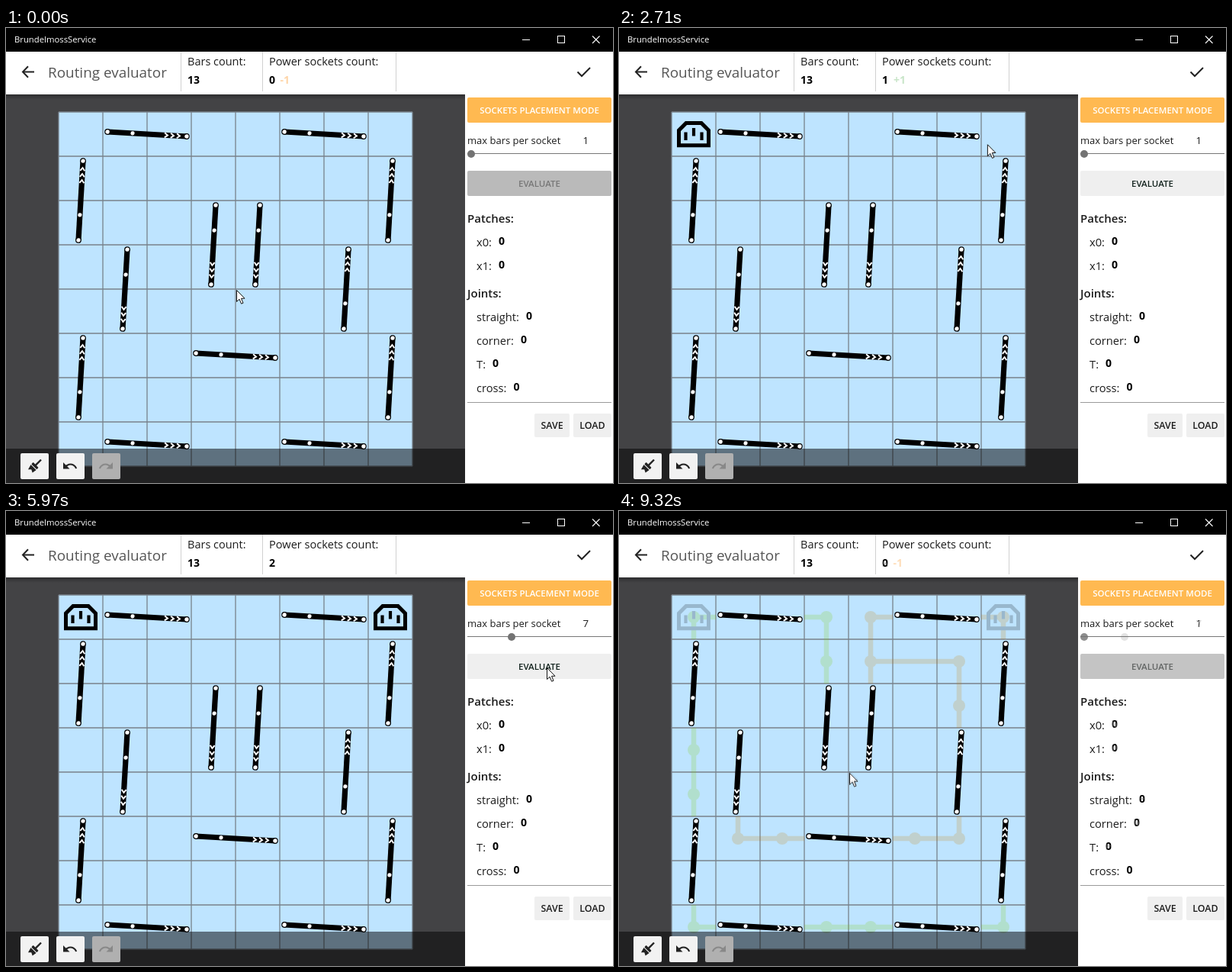
Write an HTML page with a canvas that moves like this. It is 796 px wide and 596 px high and loops after 9.39 s.

```html
<!DOCTYPE html>
<html lang="en">
<head>
<meta charset="utf-8">
<title>Routing evaluator</title>
<style>
html, body { margin: 0; width: 100%; height: 100%; overflow: hidden; background: #fff; }
canvas { display: block; }
</style>
</head>
<body>
<canvas id="stage" width="796" height="596"></canvas>
<script>
const W = 796, H = 596, LOOP = 9390;
const CELL = 58, GX = 69, GY = 110, PANEL = 602;
const SOCKET_1 = 1660, SOCKET_2 = 2930, DRAG = 3820, DRAG_END = 4880, DROP = 5085;
const SOLVED = 6050, FADE = 8630, DELTA_LIFE = 1250;
const INK = '#1c1c1c';

const stage = document.getElementById('stage').getContext('2d');
const layer = document.createElement('canvas');
layer.width = W;
layer.height = H;
const layerCtx = layer.getContext('2d');
let c = stage;

// > ^ v: two-cell bars by heading; g o: joints of the two circuits; -: plain wire
const board = `
g>>go>>o
^..go-o^
^..vv.o^
gv.vv.^.
gv....^.
^oo>>oo^
^......^
g>>gg>>g`.trim().split('\n');
const wireColors = { g: '#80cc00', o: '#cc7f00', '-': '#cc7f00' };
const quarterTurns = { '>': 0, 'v': 1, '^': -1 };

// eased pointer moves
const home = { x: 302, y: 343 };
const moves = [
  { from: 550, to: 1320, x: 119, y: 169 },
  { from: 1520, to: 1640, x: 120, y: 156 },
  { from: 1900, to: 2860, x: 508, y: 152 },
  { from: 3200, to: 3690, x: 608, y: 168 },
  { from: 3900, to: DRAG_END, x: 663, y: 168 },
  { from: DROP, to: 5570, x: 709, y: 205 },
  { from: 6390, to: 6880, x: 609, y: 231 },
  { from: 6880, to: 8070, x: 302, y: 341 }
];
const presses = [SOCKET_1, SOCKET_2, SOLVED].map(t => [t - 70, t + 190]).concat([[DRAG, DROP]]);

const clamp = (v, a = 0, b = 1) => Math.min(b, Math.max(a, v));
const smooth = u => u * u * (3 - 2 * u);
const cellAt = (col, row) => (board[row] || '')[col] || '.';

function rect(x, y, w, h, fill, radius = 0) {
  c.fillStyle = fill;
  c.beginPath();
  c.roundRect(x, y, w, h, radius);
  c.fill();
}

function disc(x, y, r, fill) {
  c.fillStyle = fill;
  c.beginPath();
  c.arc(x, y, r, 0, Math.PI * 2);
  c.fill();
}

function trace(points) {
  c.beginPath();
  points.forEach(p => c.lineTo(p[0], p[1]));
}

function line(points, color, width = 1, close = false) {
  trace(points);
  if (close) c.closePath();
  c.strokeStyle = color;
  c.lineWidth = width;
  c.stroke();
}

function text(s, x, y, size, color = INK, weight = 400, align = 'left') {
  c.font = `${weight} ${size}px "Open Sans", "Noto Sans", sans-serif`;
  c.fillStyle = color;
  c.textAlign = align;
  c.fillText(s, x, y);
  return c.measureText(s).width;
}

function pointerAt(t) {
  let { x, y } = home;
  for (const m of moves) {
    const u = smooth(clamp((t - m.from) / (m.to - m.from)));
    x += (m.x - x) * u;
    y += (m.y - y) * u;
  }
  return [x, y];
}

function drawBar(col, row, turns) {
  const half = 52;
  c.save();
  c.translate(GX + (col + (turns ? .5 : 1)) * CELL, GY + (row + (turns ? 1 : .5)) * CELL);
  c.rotate(turns * Math.PI / 2 + .058);
  line([[-half, 0], [half, 0]], '#000', 7.2);
  for (const x of [-half, half]) {
    disc(x, 0, 3.9, '#000');
    disc(x, 0, 2.7, '#fff');
  }
  disc(33 - half, 0, 2.6, '#fff');
  for (let i = 0; i < 3; i++) {
    const x = 23 + 8 * i;
    line([[x, -3], [x + 4, 0], [x, 3]], '#fff', 2);
  }
  c.restore();
}

function drawBars() {
  board.forEach((cells, row) => [...cells].forEach((kind, col) => {
    const turns = quarterTurns[kind];
    if (turns === undefined) return;
    const before = turns ? cellAt(col, row - 1) : cellAt(col - 1, row);
    if (before !== kind) drawBar(col, row, turns);
  }));
}

// A joint reaches half a cell toward its own circuit or a bar's end.
function drawWires() {
  board.forEach((cells, row) => [...cells].forEach((kind, col) => {
    const color = wireColors[kind];
    if (!color) return;
    const x = GX + (col + .5) * CELL, y = GY + (row + .5) * CELL;
    for (const [dx, dy] of [[1, 0], [-1, 0], [0, 1], [0, -1]]) {
      const next = cellAt(col + dx, row + dy);
      const linked = next === kind || (dx ? '>-' : '^v').includes(next) || (kind === '-' && next === 'o');
      if (linked) line([[x, y], [x + dx * CELL / 2, y + dy * CELL / 2]], color, 6.5);
    }
    if (kind !== '-') disc(x, y, 8, color);
  }));
}

function drawSocket(col) {
  c.save();
  c.translate(GX + (col + .5) * CELL, GY + CELL / 2);
  const side = s => [[s * 19.5, 14.7], [s * 19.5, -5], [s * 10, -14.5]];
  line([...side(-1), ...side(1).reverse()], '#000', 5, true);
  for (const i of [-1, 0, 1]) rect(i * 10.5 - 2.1, i ? -2.5 : -8, 4.2, 10.5, '#000');
  c.restore();
}

function drawBoard(t) {
  const size = 8 * CELL;
  rect(0, 87, PANEL, H - 87, '#434345');
  rect(GX, GY, size, size, '#bee4ff');
  for (let i = 0; i <= 8; i++) {
    const d = i * CELL;
    line([[GX + d, GY], [GX + d, GY + size]], '#78828a', 1.3);
    line([[GX, GY + d], [GX + size, GY + d]], '#78828a', 1.3);
  }
  if (t >= SOLVED) drawWires();
  drawBars();
  if (t >= SOCKET_1) drawSocket(0);
  if (t >= SOCKET_2) drawSocket(7);
}

function drawTurn(x, dir, color) {
  c.save();
  c.translate(x, 574);
  c.scale(dir, 1);
  c.strokeStyle = color;
  c.lineWidth = 2.2;
  c.beginPath();
  c.arc(.5, 5.5, 8, -Math.PI * .83, -Math.PI * .1);
  c.stroke();
  trace([[-9, -5], [-9, 3.5], [-.5, 3.5]]);
  c.fillStyle = color;
  c.fill();
  c.restore();
}

function drawBrush(x, y, color) {
  c.save();
  c.translate(x, y);
  c.rotate(-Math.PI / 4);
  rect(2, -1.2, 10, 2.4, color);
  rect(-1, -5, 3.4, 10, color, 1);
  trace([[-2, -5], [-2, 5], [-8, 4], [-6, 0], [-9, -3]]);
  c.fillStyle = color;
  c.fill();
  c.restore();
}

function drawFooter() {
  rect(0, 551, PANEL, 45, 'rgba(0,0,0,.5)');
  ['#f2f2f2', '#f2f2f2', '#b0b0b0'].forEach((fill, i) => rect(19 + 47 * i, 557, 37, 34, fill, 2));
  drawBrush(37.5, 574, '#222');
  drawTurn(84, 1, '#222');
  drawTurn(131, -1, '#888');
}

function drawHeader() {
  const shade = c.createLinearGradient(0, 87, 0, 94);
  shade.addColorStop(0, 'rgba(0,0,0,.32)');
  shade.addColorStop(1, 'rgba(0,0,0,0)');
  rect(0, 87, PANEL, 7, shade);
  rect(0, 31, W, 56, '#fff');
  rect(0, 0, W, 31, '#000');
  text('BrundelmossService', 11, 19, 11.3, '#fff');
  line([[677, 15.5], [687, 15.5]], '#fff');
  c.strokeRect(723.5, 10.5, 9, 9);
  line([[769, 10.5], [778.5, 20]], '#fff', 1.1);
  line([[778.5, 10.5], [769, 20]], '#fff', 1.1);
  line([[37, 57.5], [22.5, 57.5]], '#222', 2);
  line([[29, 50.3], [22, 57.5], [29, 64.7]], '#222', 2);
  line([[749.5, 57.5], [755, 63], [766, 52]], '#222', 2);
  text('Routing evaluator', 55, 65, 18.9, '#555');
  for (const x of [229.5, 336.5, 511.5]) line([[x, 31], [x, 83]], '#d0d0d0');
  text('Bars count:', 238, 49, 14.5);
  text('Power sockets count:', 345, 49, 14.6);
}

function drawValue(n, x, y) {
  text(n, x, y, 14, '#000', 700);
}

function drawDelta(n, x, y, age) {
  const p = age / DELTA_LIFE;
  if (p < 0 || p >= 1) return;
  text('+' + n, x, y, 14, `rgba(${80 * p},${200 * p},${80 * p},${1 - p * p})`, 700);
}

function drawGroup(title, y, counts, t) {
  text(title, 605, y, 15, INK, 600);
  Object.entries(counts).forEach(([label, n], i) => {
    const base = y + 31 * (i + 1);
    const x = 617 + text(label + ':', 617, base, 14.7) + 9;
    drawValue(t >= SOLVED ? n : 0, x, base - 2);
    if (n) drawDelta(n, x + 14.5, base - 2, t - SOLVED);
  });
}

function drawCounters(t) {
  drawValue(13, 238, 73);
  drawValue((t >= SOCKET_1) + (t >= SOCKET_2), 345, 73);
  drawDelta(1, 360, 73, t - (t >= SOCKET_2 ? SOCKET_2 : SOCKET_1));
  if (t < 140) text('-1', 359.5, 73, 14, `rgba(253,190,120,${.65 * (1 - t / 140)})`, 700);
  drawGroup('Patches:', 255, { x0: 7, x1: 1 }, t);
  drawGroup('Joints:', 353, { straight: 8, corner: 7, T: 3, cross: 0 }, t);
}

function drawButton(label, x, y, w, h, fill = '#efefef', ink = INK, size = 12.4) {
  rect(x, y, w, h, fill, 2);
  text(label, x + w / 2, y + h / 2 + 4.5, size, ink, 600, 'center');
}

function drawSlider(t) {
  const thumb = 610 + (pointerAt(clamp(t, DRAG, DRAG_END))[0] - 608) * 53 / 55;
  const pressed = t >= DRAG && t < DROP;
  const grow = pressed ? 1 : t < DRAG ? 0 : 1 - clamp((t - DROP) / 180);
  text('max bars per socket', 605, 152, 13);
  text(1 + Math.round((thumb - 610) / 8.83), 756.5, 152, 13.3);
  line([[605, 164.5], [794, 164.5]], pressed ? '#3f51b5' : '#767676');
  disc(thumb, 165, 5 + 4 * grow, '#737373');
}

function drawPanel(t) {
  const ready = t >= SOCKET_1;
  rect(PANEL, 87, W - PANEL, H - 87, '#fff');
  drawButton('SOCKETS PLACEMENT MODE', 605, 91, 189, 33, '#ffb951', '#fff', 11.5);
  drawSlider(t);
  drawButton('EVALUATE', 605, 187, 189, 33, ready ? '#efefef' : '#bababa', ready ? '#14241f' : '#777', 11.5);
  line([[605, 490.5], [794, 490.5]], '#9a9a9a');
  drawButton('SAVE', 693, 505, 46, 31);
  drawButton('LOAD', 744, 505, 50, 31);
}

function drawPointer(t) {
  const [x, y] = pointerAt(t);
  if (presses.some(([from, to]) => t >= from && t < to)) disc(x + .5, y - .5, 12.3, 'rgba(215,205,20,.62)');
  c.save();
  c.translate(x, y);
  trace([[.5, .5], [.5, 15.5], [4, 12.2], [6.6, 18.2], [9, 17.2], [6.5, 11.3], [11, 11.2]]);
  c.closePath();
  c.fillStyle = '#fff';
  c.fill();
  c.strokeStyle = '#111';
  c.lineWidth = 1;
  c.stroke();
  c.restore();
}

function drawScene(ctx, t) {
  c = ctx;
  drawBoard(t);
  drawFooter();
  drawPanel(t);
  drawHeader();
  drawCounters(t);
  drawPointer(t);
}

function render(t) {
  drawScene(stage, t);
  if (t <= FADE) return;
  // dissolve into the opening state
  drawScene(layerCtx, 0);
  stage.globalAlpha = (t - FADE) / 860;
  stage.drawImage(layer, 0, 0);
  stage.globalAlpha = 1;
}

const start = performance.now();
function tick() {
  render((performance.now() - start) % LOOP);
  requestAnimationFrame(tick);
}
tick();
</script>
</body>
</html>
```
